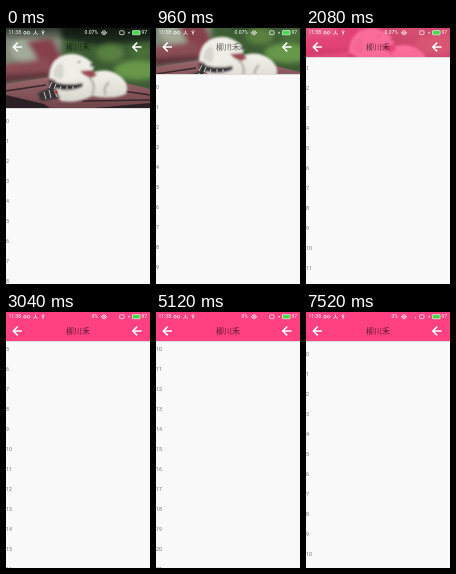
Write an HTML page that moves like this. It is 144 px wide and 256 px high and loops after 8000 ms.

```html
<!DOCTYPE html>
<html lang="zh">
<head>
<meta charset="utf-8">
<style>
html, body { margin: 0; width: 100%; height: 100%; overflow: hidden; background: #f9f9f9; }
svg { display: block; width: 100%; height: 100%; }
text { font-family: Roboto, sans-serif; font-size: 5.3px; }
#rows { fill: #777; }
#status text { fill: #fff; font-size: 5px; }
#title { font: 8px "Noto Sans CJK SC", "Noto Sans CJK", sans-serif; fill: #000; fill-opacity: .62; }
.line { fill: none; stroke: #fff; }
</style>
</head>
<body>
<svg viewBox="0 0 144 256">
  <defs>
    <clipPath id="headerClip"><rect id="headerBox" width="144" height="80"/></clipPath>
    <filter id="soft"><feGaussianBlur stdDeviation="2.5"/></filter>
    <filter id="fur"><feGaussianBlur stdDeviation=".8"/></filter>
    <linearGradient id="shade" x2="0" y2="1">
      <stop stop-color="#0c120c" stop-opacity=".7"/>
      <stop offset="1" stop-color="#0c120c" stop-opacity="0"/>
    </linearGradient>
    <linearGradient id="wood" x2="0" y2="1">
      <stop stop-color="#99676c"/><stop offset="1" stop-color="#70444a"/>
    </linearGradient>
    <linearGradient id="coat" x2="0" y2="1">
      <stop stop-color="#f2f2ea"/><stop offset="1" stop-color="#d8d6cc"/>
    </linearGradient>
    <path id="arrow" class="line" stroke-width="1.5" d="M16 19H7.5M11.7 14.6L7.3 19L11.7 23.4"/>
  </defs>
  <rect width="144" height="256" fill="#f9f9f9"/>
  <g id="rows"></g>
  <rect id="shadow" width="144" height="1" fill="#000" opacity=".12"/>
  <g clip-path="url(#headerClip)">
    <g id="photo">
      <rect width="144" height="80" fill="#3d5c34"/>
      <g filter="url(#soft)">
        <rect x="-8" y="-8" width="64" height="66" fill="#838b7c"/>
        <ellipse cx="24" cy="22" rx="20" ry="12" fill="#a2aa98"/>
        <path d="M54 -6H150V12L96 18L54 10Z" fill="#1d2c1c"/>
        <ellipse cx="104" cy="25" rx="14" ry="9" fill="#58803f"/>
        <ellipse cx="132" cy="42" rx="24" ry="10" fill="#67974a"/>
        <ellipse cx="136" cy="24" rx="12" ry="6" fill="#486e38"/>
        <path d="M20 13L46 10L56 30L50 52L40 44Z" fill="#85414b"/>
        <path d="M-6 36L42 30L46 46L-6 50Z" fill="#8b4d54"/>
        <path d="M-6 47L44 44V51L-6 57Z" fill="#5b3239"/>
      </g>
      <path d="M0 56L45 49L112 53L144 61V80H0Z" fill="url(#wood)"/>
      <path d="M0 67L38 76L44 80H0ZM88 80L144 75V80Z" fill="#2b2025"/>
      <path d="M0 63L40 57M76 73L144 72M110 62L144 67" fill="none" stroke="#38252b" stroke-width="1.3"/>
      <g filter="url(#fur)">
        <path d="M50 50Q62 45 82 46Q101 38 114 48Q124 56 120 66Q107 72 86 68Q70 76 55 73Q46 64 50 50Z" fill="url(#coat)"/>
        <path d="M82 49Q91 55 86 67M103 54Q96 61 100 67" fill="none" stroke="#aaa79e" stroke-width="2"/>
        <path d="M43 50Q43 35 53 29Q65 23 76 28Q83 31 88 37L87 42L80 44L89 48Q78 53 70 49Q58 57 43 50Z" fill="#eeeee7"/>
        <path d="M47 48Q48 36 56 35Q60 44 55 52Z" fill="#d8d7ce"/>
        <path d="M74 43L86 42L91 47L86 50Q79 49 74 43Z" fill="#9a4c55"/>
        <ellipse cx="86" cy="37" rx="2.2" ry="1.6" fill="#242126"/>
        <circle cx="73" cy="34" r="1" fill="#3a3435"/>
        <path d="M43 51Q55 59 77 55L76 59Q62 65 49 60L54 70L35 73L32 65L44 60Z" fill="#343035"/>
      </g>
      <path d="M46 54L43 60M50 56L48 61M55 58L54 62M61 58V62M67 58V61M38 64L40 71M43 62L45 70M48 62L51 69" stroke="#c9c5c0" stroke-width="1"/>
      <circle cx="50" cy="64" r="1.8" fill="#b43b45"/>
      <rect width="144" height="13" fill="url(#shade)"/>
    </g>
    <rect id="scrim" width="144" height="80" fill="#ff4081"/>
    <text id="title" x="72" y="22" text-anchor="middle">柳川禾</text>
  </g>
  <use href="#arrow"/><use href="#arrow" x="119.5"/>
  <g id="status">
    <text x="2.5" y="6.4">11:38</text>
    <g class="line" stroke-width=".7">
      <circle cx="19" cy="4.7" r="1.3"/><circle cx="22.5" cy="4.7" r="1.3"/>
      <path d="M29.5 2.5V5L27.3 6.5M29.5 5L31.8 6.5M37 2V7M35.5 3.5L37 5L38.5 3.5"/>
      <circle cx="98" cy="4.7" r="2"/><path d="M95 4.7H96M100 4.7H101M97.4 3.8V5.6M98.6 3.8V5.6"/>
      <rect x="113.7" y="2.8" width="4.3" height="3.8" rx=".6"/>
    </g>
    <text id="speed" x="92" y="6.4" text-anchor="end"></text>
    <circle id="dot" cx="109.4" cy="5.8" r=".6" fill="#fff"/>
    <path d="M122 4.7L123.5 3.4V6Z" fill="#fff"/>
    <rect x="126.5" y="2.6" width="7.6" height="4.2" rx=".5" fill="#3edb48" stroke="#fff" stroke-width=".6"/>
    <text x="135.5" y="6.4">97</text>
  </g>
</svg>
<script>
const LOOP = 8000, STEP = 160, ROW = 20, MIN_HEADER = 29, MAX_HEADER = 80;
// Time in ms, scroll distance in px.
const scrollKeys = [[0, 0], [320, 15], [960, 34], [2080, 73], [4000, 240],
  [4480, 267], [4800, 273], [5280, 248], [6080, 180], [7520, 51], [LOOP, 51]];
const $ = id => document.getElementById(id);
const clamp = (v, lo, hi) => Math.min(hi, Math.max(lo, v));

const rows = Array.from({ length: 32 }, (_, i) => {
  const row = document.createElementNS("http://www.w3.org/2000/svg", "text");
  row.textContent = i;
  row.setAttribute("y", 95 + i * ROW);
  return $("rows").appendChild(row);
});

function scrollAt(t) {
  const i = scrollKeys.findIndex(key => key[0] > t);
  const [t0, s0] = scrollKeys[i - 1], [t1, s1] = scrollKeys[i];
  return s0 + (s1 - s0) * (t - t0) / (t1 - t0);
}

function draw() {
  const t = Math.min(7520, Math.floor(performance.now() % LOOP / STEP) * STEP);
  const scroll = scrollAt(t);
  const collapsed = t >= 1600;
  const header = collapsed ? MIN_HEADER : Math.max(MIN_HEADER, MAX_HEADER - scroll);
  // Rows slide under the bar, so they are hidden above its lower edge.
  $("rows").setAttribute("transform", `translate(0 ${-scroll})`);
  $("headerBox").setAttribute("height", header);
  $("shadow").setAttribute("y", header);
  $("photo").setAttribute("transform", `translate(0 ${(header - MAX_HEADER) / 2})`);
  $("scrim").setAttribute("opacity", clamp((t - 1600) / 640, 0, 1));
  $("speed").textContent = t < 2400 ? "0.07%" : "0%";
  $("dot").setAttribute("opacity", t >= 7040 ? 1 : 0);
  requestAnimationFrame(draw);
}
draw();
</script>
</body>
</html>
```
